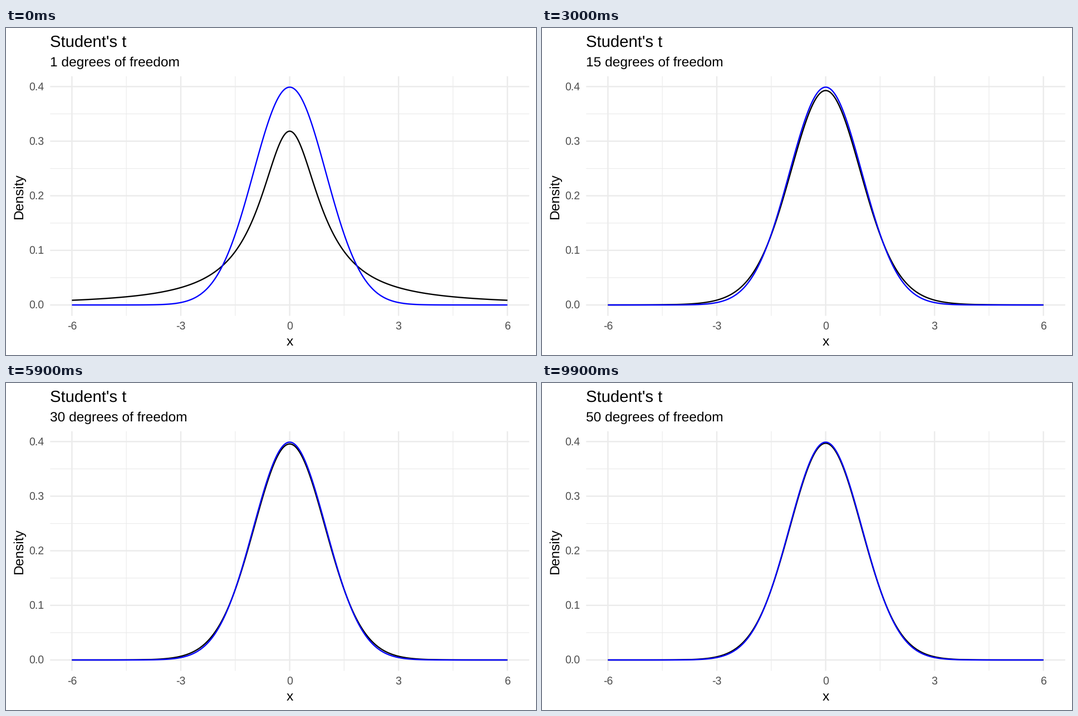
A matplotlib script for the animation above (10000 ms loop, 952 px wide and 588 px high).

```python
import math

import matplotlib.pyplot as plt
import numpy as np
from matplotlib.animation import FuncAnimation

W, H, DPI = 952, 588, 160
FRAMES, INTERVAL = 100, 100
MAX_DF = 50
LEFT, RIGHT, TOP, BOTTOM = 79.3, 939.8, 86.8, 517.6
X_MAX = 6
Y_MAX = 1 / math.sqrt(2 * math.pi)
THIN, THICK = 0.535, 1.067  # line widths in points
GRID, TICK_TEXT = "#EBEBEB", "#4D4D4D"

plt.rcParams.update({
    "font.family": "Liberation Sans",
    "text.hinting": "none",
    "path.snap": False,
    "path.simplify": False,
})


def px(x):
    return (LEFT + RIGHT) / 2 + x * (RIGHT - LEFT) / (2.2 * X_MAX)


def py(y):
    pad = (BOTTOM - TOP) / 22
    return BOTTOM - pad - y / Y_MAX * (BOTTOM - TOP - 2 * pad)


def t_density(x, df):
    log_c = math.lgamma((df + 1) / 2) - math.lgamma(df / 2)
    c = math.exp(log_c) / math.sqrt(df * math.pi)
    return c * (1 + x * x / df) ** (-(df + 1) / 2)


fig = plt.figure(figsize=(W / DPI, H / DPI), dpi=DPI, facecolor="white")
ax = fig.add_axes([0, 0, 1, 1])
ax.set_xlim(0, W)
ax.set_ylim(H, 0)
ax.axis("off")


def line(xs, ys, color, width):
    return ax.plot(xs, ys, color=color, lw=width, solid_capstyle="butt",
                   solid_joinstyle="round", snap=False)[0]


def label(x, y, text, size, color="black", **kw):
    kw = {"ha": "center", "va": "baseline", **kw}
    return ax.text(x, y, text, fontsize=size, color=color, **kw)


def grid(xs, ys, width):
    for y in ys:
        line([LEFT, RIGHT], [py(y)] * 2, GRID, width)
    for x in xs:
        line([px(x)] * 2, [TOP, BOTTOM], GRID, width)


x_ticks = range(-6, 7, 3)
y_ticks = [k / 10 for k in range(5)]
grid([-4.5, -1.5, 1.5, 4.5], [0.05, 0.15, 0.25, 0.35], THIN)
grid(x_ticks, y_ticks, THICK)

for x in x_ticks:
    label(px(x), 543.2, str(x), 8.8, TICK_TEXT)
for y in y_ticks:
    label(68.3, py(y) + 7, f"{y:.1f}", 8.8, TICK_TEXT, ha="right")

mid_x, mid_y = (LEFT + RIGHT) / 2, (TOP + BOTTOM) / 2
label(mid_x, 570.6, "x", 11)
label(29.8, mid_y, "Density", 11, rotation=90, ha="right", va="center",
      rotation_mode="default").remove()
label(29.8, mid_y, "Density", 11, rotation=90, rotation_mode="anchor")
label(LEFT, 33.3, "Student's t", 13.2, ha="left")
subtitle = label(LEFT, 69.5, "", 11, ha="left")

xs = np.linspace(-X_MAX, X_MAX, 481)
curves = [t_density(xs, df) for df in range(1, MAX_DF + 1)]
key_frames = np.round(np.arange(MAX_DF) / (MAX_DF - 1) * (FRAMES - 1))
t_line = line(px(xs), py(curves[0]), "black", THICK)
line(px(xs), py(Y_MAX * np.exp(-xs * xs / 2)), "blue", THICK)


def draw(i):
    # The first curve holds for two frames before it starts to move.
    pos = 0 if i < 2 else np.interp(i, key_frames, np.arange(MAX_DF))
    k = int(pos)
    nxt = min(k + 1, MAX_DF - 1)
    t_line.set_ydata(py(curves[k] + (pos - k) * (curves[nxt] - curves[k])))
    df = 1 + (MAX_DF - 1) * i // (FRAMES - 1)
    subtitle.set_text(f"{df} degrees of freedom")
    return t_line, subtitle


anim = FuncAnimation(fig, draw, frames=FRAMES, interval=INTERVAL,
                     repeat=True, repeat_delay=0)
plt.show()
```
